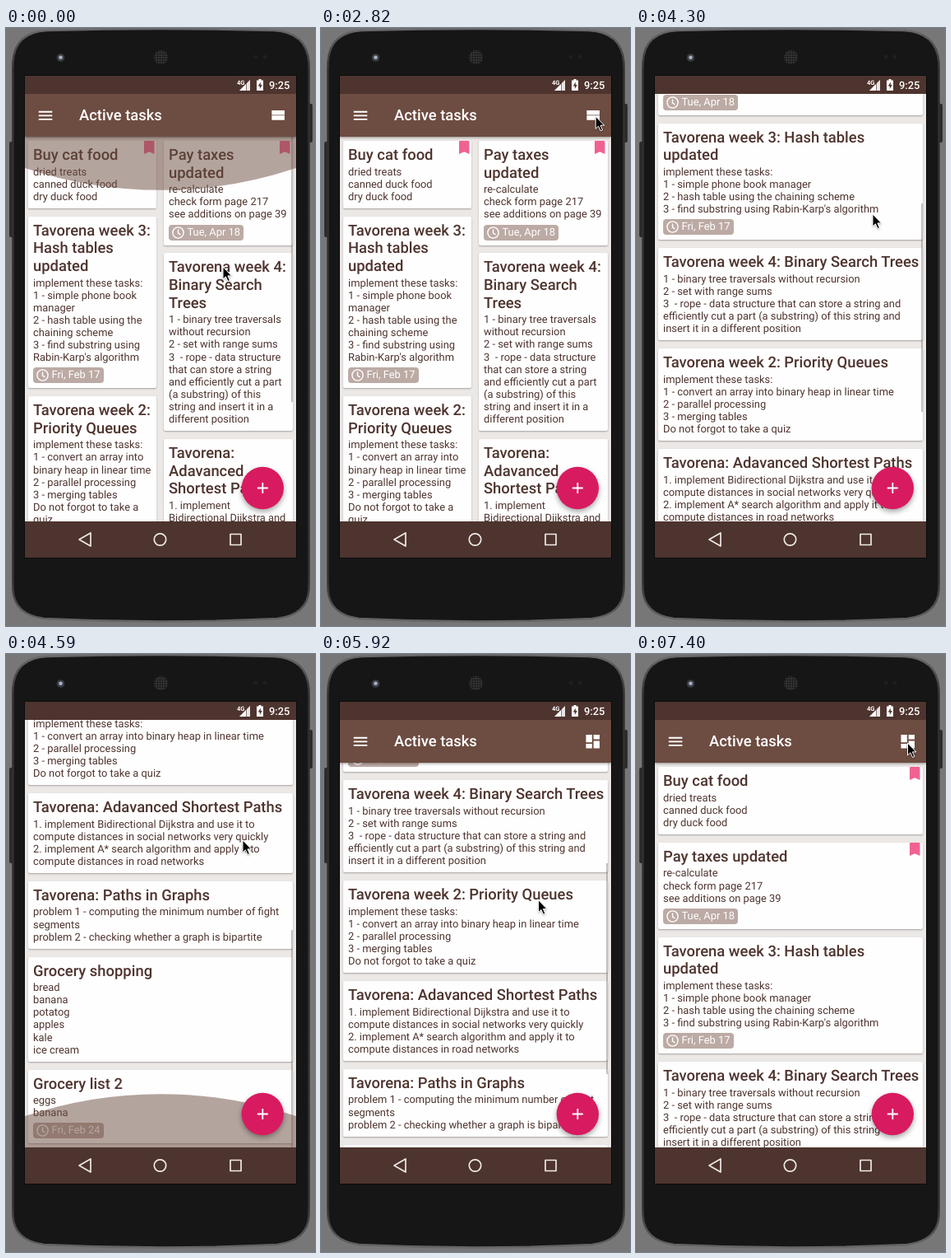
Write an HTML page that moves like this. It is 376 px wide and 726 px high and loops after 8000 ms.

```html
<!DOCTYPE html>
<html lang="en">
<head>
<meta charset="utf-8">
<title>Active tasks</title>
<style>
  html, body { margin: 0; width: 100%; height: 100%; overflow: hidden; background: #777; }
  body { position: relative; font: 12.9px/15.1px Roboto, sans-serif; color: #4e342e; text-rendering: geometricPrecision; }
  svg { position: absolute; left: 0; top: 0; overflow: visible; }
  #view { position: absolute; left: 23px; top: 80px; width: 330px; height: 519px; overflow: hidden; background: #ece8e6; }
  .list { position: absolute; left: 0; top: 57.1px; width: 330px; }
  .column { position: absolute; top: 0; left: 4px; width: 156px; }
  .column + .column { left: 169px; width: 156.5px; }
  #wide .column { width: 321.5px; }
  .card { position: relative; box-sizing: border-box; margin-bottom: 9.9px; padding: 7px 6px 6px;
    background: #fefefe; border-radius: 2px; box-shadow: 0 1px 2px rgba(0, 0, 0, .3); }
  .card h2 { margin: 0 0 2px; font: 500 18.4px/21.6px Roboto, sans-serif; white-space: pre; }
  .card p { margin: 0; white-space: pre; }
  .text { overflow: hidden; margin-right: -6px; }
  .chip { position: relative; display: block; width: max-content; height: 19px; margin-top: 4px; padding: 0 4.5px 0 22.5px;
    border-radius: 4px; background: #bcaaa4; color: #fff; line-height: 19px; }
  .chip svg { left: 4px; top: 2px; }
  .mark { left: auto; right: 3px; top: 0; }
  #thumb { position: absolute; right: 4px; width: 2.5px; background: rgba(90, 80, 76, .35); }
  #bar { position: absolute; left: 0; top: 0; width: 330px; height: 52px; background: #6d4c41; color: #fff;
    box-shadow: 0 1px 3px rgba(0, 0, 0, .4); font: 500 18.4px/52px Roboto, sans-serif; }
  #bar span { position: absolute; left: 66px; top: 1px; }
</style>
</head>
<body>
<svg width="376" height="726">
  <defs>
    <linearGradient id="rim" x2="0" y2="1">
      <stop offset="0" stop-color="#6a6a6a"/><stop offset=".07" stop-color="#303030"/>
      <stop offset=".93" stop-color="#303030"/><stop offset="1" stop-color="#666"/>
    </linearGradient>
    <pattern id="mesh" width="3" height="3" patternUnits="userSpaceOnUse">
      <rect width="3" height="3" fill="#343434"/><circle cx="1.5" cy="1.5" r="1" fill="#111"/>
    </pattern>
  </defs>
  <g fill="#2b2b2b">
    <rect x="4" y="138" width="6" height="116" rx="2"/>
    <rect x="366" y="92" width="7" height="47" rx="2"/>
  </g>
  <path d="M8.500 42Q10 5 50 3Q188 -1 326 3Q366 5 368.500 42V682Q367 712 330 717Q188 724 46 717Q10 712 8.500 682Z" fill="#161616" stroke="url(#rim)" stroke-width="2.500"/>
  <circle cx="66.500" cy="36" r="4.800" fill="#3b3c42"/>
  <circle cx="66.500" cy="35.800" r="2.300" fill="#a9b1c6"/>
  <circle cx="188.500" cy="35.500" r="8.500" fill="url(#mesh)"/>
  <circle cx="304" cy="35" r="2.500" fill="#241d1d"/><circle cx="315" cy="35" r="2.500" fill="#241d1d"/>
  <rect x="22" y="57" width="332" height="587" fill="#0c0c0c"/>
</svg>

<div id="view">
  <div id="narrow" class="list"></div>
  <div id="wide" class="list"></div>
  <div id="thumb"></div>
  <svg width="330" height="519" fill="#6d4c41">
    <path id="topGlow" d="M0 0V38A520 520 0 0 0 330 38V0Z"/>
    <path id="bottomGlow" d="M0 0V-38A520 520 0 0 1 330 -38V0Z"/>
  </svg>
  <div id="bar">
    <span>Active tasks</span>
    <svg width="330" height="52" fill="#fff">
      <circle id="ripple" cx="308" cy="26" r="25" fill="#000" opacity=".07"/>
      <path transform="translate(14 15.300) scale(.92)" d="M3 6h18v2H3zM3 11h18v2H3zM3 16h18v2H3z"/>
      <g transform="translate(296.700 15.300) scale(.92)">
        <path id="streamIcon" d="M4 18h17v-6H4zM4 5v6h17V5z"/>
        <path id="boardIcon" d="M3 13h8V3H3zM3 21h8v-6H3zM13 21h8V11h-8zM13 3v6h8V3z"/>
      </g>
    </svg>
  </div>
</div>

<svg width="376" height="726">
  <rect x="23" y="58" width="330" height="22" fill="#4e342e"/>
  <g fill="#fff" font-family="Roboto, sans-serif">
    <text x="320" y="74" font-size="12.900" font-weight="500">9:25</text>
    <text x="281" y="69" font-size="7.500" font-weight="700">4G</text>
    <path d="M284 76L297 63V76Z" opacity=".35"/>
    <path d="M284 76L292 68V76Z"/><path d="M293 67L297 63V76H293Z" opacity=".8"/>
    <path d="M307.500 62h3v1.500h2.500v12.500h-8V63.500h2.500Z"/>
    <path d="M309.800 65.500l-3 5h2v3.500l3-5h-2Z" fill="#4e342e"/>
  </g>
  <rect x="23" y="599" width="330" height="44" fill="#4e342e"/>
  <g fill="none" stroke="#eee9e7" stroke-width="1.700" stroke-linejoin="round">
    <path d="M89 621L103 613V629Z"/>
    <circle cx="187.500" cy="621" r="7.200"/>
    <rect x="273" y="614.500" width="13" height="13"/>
  </g>
  <g style="filter: drop-shadow(0 3px 3px rgba(0,0,0,.35))"><circle cx="312.300" cy="558.500" r="25.700" fill="#d81b60"/></g>
  <path d="M305.800 558.500h13M312.300 552v13" stroke="#fff" stroke-width="1.800"/>
  <path id="cursor" d="M0 0V15L3.400 11.800L6 17.500L8.400 16.500L5.900 10.900H10.500Z" stroke="#fff" stroke-width="1" style="filter: drop-shadow(0 1px 1px rgba(0,0,0,.3))"/>
</svg>

<script>
// "|" breaks a line only in the narrow layout, "~" only in the wide one.
const tasks = {
  cat: { title: 'Buy cat food', text: 'dried treats\ncanned duck food\ndry duck food', marked: true },
  taxes: { title: 'Pay taxes|updated', text: 're-calculate\ncheck form page 217\nsee additions on page 39', date: 'Tue, Apr 18', marked: true },
  hash: {
    title: 'Tavorena week 3:|Hash tables\nupdated', date: 'Fri, Feb 17',
    text: 'implement these tasks:\n1 - simple phone book|manager\n2 - hash table using the|chaining scheme\n' +
      "3 - find substring using|Rabin-Karp's algorithm"
  },
  trees: {
    title: 'Tavorena week 4:|Binary Search|Trees',
    text: '1 - binary tree traversals|without recursion\n2 - set with range sums\n3  - rope - data structure|that can store a string|and~' +
      'efficiently cut a part|(a substring) of this|string and~insert it in a|different position'
  },
  queues: {
    title: 'Tavorena week 2:|Priority Queues',
    text: 'implement these tasks:\n1 - convert an array into|binary heap in linear time\n2 - parallel processing\n' +
      '3 - merging tables\nDo not forgot to take a|quiz'
  },
  shortest: {
    title: 'Tavorena:|Adavanced|Shortest Paths',
    text: '1. implement|Bidirectional Dijkstra and|use it to~compute distances in social networks very quickly\n' +
      '2. implement A* search algorithm and apply it to~compute distances in road networks'
  },
  graphs: {
    title: 'Tavorena: Paths in Graphs',
    text: 'problem 1 - computing the minimum number of fight~segments\nproblem 2 - checking whether a graph is bipartite'
  },
  shopping: { title: 'Grocery shopping', text: 'bread\nbanana\npotatog\napples\nkale\nice cream' },
  second: { title: 'Grocery list 2', text: 'eggs\nbanana', date: 'Fri, Feb 24' }
};

const $ = id => document.getElementById(id);
const clock = '<svg width="15" height="15" fill="none" stroke="#fff" stroke-width="1.4"><circle cx="7.500" cy="7.500" r="6.600"/><path d="M7.500 3.500V8L10.500 9.800"/></svg>';
const bookmark = '<svg class="mark" width="12.500" height="16"><path d="M1.200 0h10q1.300 0 1.300 1.300V16L6.250 13.300L0 16V1.300Q0 0 1.200 0" fill="#f06292"/></svg>';

function cardHtml(task, wide) {
  const wrap = s => wide ? s.replace(/\|/g, ' ').replace(/ ?~/g, '\n') : s.replace(/~/g, ' ').replace(/\|/g, '\n');
  const chip = task.date ? `<span class="chip">${clock}${task.date}</span>` : '';
  return `<div class="card"><div class="text"><h2>${wrap(task.title)}</h2><p>${wrap(task.text)}</p></div>${chip}${task.marked ? bookmark : ''}</div>`;
}

function fill(id, columns) {
  const wide = id === 'wide';
  $(id).innerHTML = columns.map(names =>
    `<div class="column">${names.map(name => cardHtml(tasks[name], wide)).join('')}</div>`).join('');
}
fill('narrow', [['cat', 'hash', 'queues'], ['taxes', 'trees', 'shortest']]);
fill('wide', [Object.keys(tasks)]);

// Keys are [step, value, ...]; values are linear between them.
const STEP = 148, LOOP = 8000, BOTTOM = 570, BAR = 52;
const cursorKeys = [[0, 264, 290], [2, 264, 290], [8, 335, 109], [18, 335, 109], [21, 332.5, 104], [24, 332.5, 104],
  [27, 288, 226], [35, 288, 226], [38, 264.5, 299], [47, 264.5, 297.5], [50, 330.5, 108]];
const scrollKeys = [[28, 0], [29, .4], [30, .93], [31, 1], [39, 1], [40, .6], [41, .12], [42, 0]];
const thumbKeys = [[0, 1], [3, 1], [6, 0], [28, 0], [29, 1], [44, 1], [47, 0]];

function at(keys, step) {
  const next = keys.findIndex(key => key[0] > step);
  if (next === 0) return keys[0].slice(1);
  if (next < 0) return keys[keys.length - 1].slice(1);
  const a = keys[next - 1], b = keys[next], p = (step - a[0]) / (b[0] - a[0]);
  return a.slice(1).map((v, i) => v + (b[i + 1] - v) * p);
}

// Overscroll glow recedes over 600 ms with a decelerating curve.
const recede = age => age < 0 || age > 4 ? 0 : (1 - age / 4) ** 2;

function setGlow(id, y, size) {
  $(id).setAttribute('transform', `translate(0 ${y}) scale(1 ${size})`);
  $(id).setAttribute('opacity', size / 2);
}

const show = (id, on) => { $(id).style.display = on ? '' : 'none'; };

function render(time) {
  const step = Math.floor((time % LOOP + 6) / STEP);
  const wide = step >= 23;
  const [scroll] = at(scrollKeys, step);
  const barShift = step >= 29 && step < 40 ? Math.min(BAR, scroll * BOTTOM) : 0;
  const [x, y] = at(cursorKeys, step);

  show('narrow', !wide);
  show('wide', wide);
  show('streamIcon', !wide);
  show('boardIcon', wide);
  show('ripple', step >= 23 && step < 29);
  $('wide').style.transform = `translateY(${-scroll * BOTTOM}px)`;
  $('bar').style.transform = `translateY(${-barShift - (barShift === BAR ? 6 : 0)}px)`;

  const thumb = $('thumb').style;
  thumb.opacity = at(thumbKeys, step)[0];
  thumb.top = BAR + scroll * 203 + 'px';
  thumb.height = (wide ? 245 + scroll * 19 : 322) + 'px';

  setGlow('topGlow', BAR, wide ? recede(step - 41.33) : recede(step));
  setGlow('bottomGlow', 519, recede(step - 31));
  $('cursor').setAttribute('transform', `translate(${x} ${y})`);
}

const start = performance.now();
function tick() {
  render(performance.now() - start);
  requestAnimationFrame(tick);
}
tick();
</script>
</body>
</html>
```
